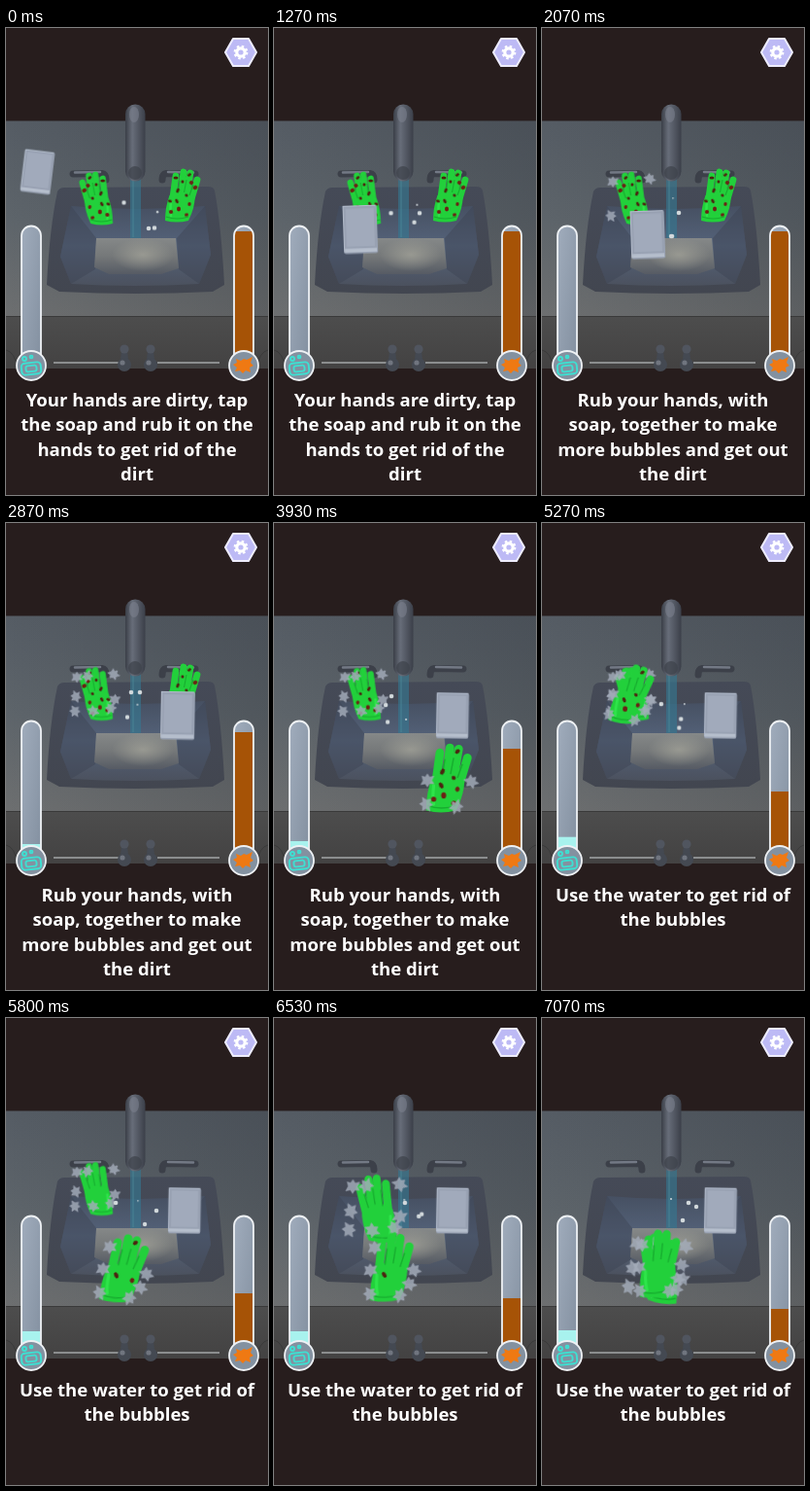
An HTML page for the animation above (7.14 s loop, 270x480 px).

```html
<!DOCTYPE html>
<html lang="en">
<head>
<meta charset="utf-8">
<title>Wash your hands</title>
<style>
html, body { margin: 0; width: 100%; height: 100%; overflow: hidden; background: #271d1d; }
svg { display: block; width: 100vw; height: 100vh; }
text { font: 700 18.55px "Open Sans", "Noto Sans", sans-serif; fill: #fff; text-anchor: middle; }

#soap, #left, #right, #dirt, #foam, .msg, .drop { animation: 7140ms linear infinite; }
#soap { animation-name: soap; }
#left { animation-name: left; }
#right { animation-name: right; }
#dirt { animation-name: dirt; }
#foam { animation-name: foam; }
.msg { animation-timing-function: step-end; }
#m1 { animation-name: m1; }
#m2 { animation-name: m2; }
#m3 { animation-name: m3; }
#d1 { animation-name: d1; }
#d2 { animation-name: d2; }
#d3 { animation-name: d3; }
#d4 { animation-name: d4; }

@keyframes soap {
  0%, 7.4% { transform: translate(32.5px, 148px) rotate(7deg) scale(.91); }
  8.4% { transform: translate(32px, 149px) rotate(4deg) scale(1.03); }
  13% { transform: translate(66px, 190px) rotate(0deg) scale(1.03); }
  17% { transform: translate(90px, 211px) rotate(-2deg) scale(1.03); }
  20% { transform: translate(86px, 196px) rotate(-2deg) scale(1.03); }
  24% { transform: translate(98px, 206px) rotate(-2deg) scale(1.03); }
  29% { transform: translate(109px, 212.5px) rotate(-2deg) scale(1.03); }
  32.5% { transform: translate(90px, 188px) rotate(-2deg) scale(1.03); }
  35.5% { transform: translate(104px, 200px) rotate(-1deg) scale(1.03); }
  40.2% { transform: translate(177px, 198px) rotate(1deg) scale(1.03); }
  43% { transform: translate(184px, 178px) rotate(1deg) scale(1.03); }
  46%, 100% { transform: translate(184px, 198px) rotate(1deg) scale(.98); }
}
@keyframes left {
  0%, 28% { transform: translate(93px, 175px); }
  40%, 88% { transform: translate(93px, 175.5px); }
  89.2% { transform: translate(94px, 172px) scale(1.27); }
  91.5%, 93.4% { transform: translate(106px, 196px) rotate(2deg) scale(1.27); }
  96% { transform: translate(117px, 244px) rotate(6deg) scale(1.27); }
  99%, 100% { transform: translate(121px, 257px) rotate(8deg) scale(1.3); }
}
@keyframes right {
  0%, 48.6% { transform: translate(182px, 172px); }
  50% { transform: translate(183px, 146px) scale(1.25); }
  52.5% { transform: translate(184px, 214px) scale(1.27); }
  55%, 58.8% { transform: translate(180px, 262px) scale(1.29); }
  61.5% { transform: translate(104px, 196px) rotate(0deg) scale(1.15); }
  64% { transform: translate(94px, 172px) rotate(4deg) scale(1.13); }
  66.2% { transform: translate(90px, 180px) rotate(8deg) scale(1.13); }
  69.5% { transform: translate(94px, 160px) rotate(8deg) scale(1.13); }
  72.5% { transform: translate(91px, 184px) rotate(8deg) scale(1.13); }
  75.5% { transform: translate(94px, 166px) rotate(8deg) scale(1.13); }
  78.4% { transform: translate(100px, 192px) rotate(8deg) scale(1.18); }
  81.2% { transform: translate(122px, 257px) rotate(5deg) scale(1.29); }
  84.5% { transform: translate(119px, 286px) rotate(4deg) scale(1.29); }
  88.7% { transform: translate(121px, 262px) rotate(2deg) scale(1.28); }
  91.5%, 93.4% { transform: translate(121px, 256px) rotate(-2deg) scale(1.28); }
  96% { transform: translate(118px, 259px) rotate(-4deg) scale(1.28); }
  99%, 100% { transform: translate(121px, 252px) rotate(-5deg) scale(1.26); }
}
@keyframes dirt {
  0%, 30% { transform: translateY(6px); }
  40.2% { transform: translateY(12px); }
  55%, 60% { transform: translateY(29px); }
  66.2% { transform: translateY(62px); }
  78% { transform: translateY(79px); }
  81.2% { transform: translateY(80px); }
  93.4% { transform: translateY(86px); }
  99%, 100% { transform: translateY(96px); }
}
@keyframes foam {
  0%, 20% { transform: translateY(136px); }
  29% { transform: translateY(131px); }
  40.2% { transform: translateY(127px); }
  55% { transform: translateY(124px); }
  66.2% { transform: translateY(121px); }
  78%, 93.4% { transform: translateY(119px); }
  99%, 100% { transform: translateY(118px); }
}
@keyframes m1 { 0% { opacity: 1; } 20%, 100% { opacity: 0; } }
@keyframes m2 { 0% { opacity: 0; } 20% { opacity: 1; } 67.2%, 100% { opacity: 0; } }
@keyframes m3 { 0% { opacity: 0; } 67.2%, 100% { opacity: 1; } }
@keyframes d1 {
  0%, 7.4% { transform: translate(147px, 206px); }
  18% { transform: translate(120px, 190px); }
  29% { transform: translate(141px, 190px); }
  40.2% { transform: translate(129px, 174px); }
  55% { transform: translate(121px, 178px); }
  66.2% { transform: translate(133px, 182px); }
  81.2% { transform: translate(113px, 190px); }
  99%, 100% { transform: translate(151px, 190px); }
}
@keyframes d2 {
  0%, 7.4% { transform: translate(153px, 205.5px); }
  18% { transform: translate(150px, 190px); }
  29% { transform: translate(134px, 214px); }
  40.2% { transform: translate(138px, 174px); }
  55% { transform: translate(115px, 187px); }
  66.2% { transform: translate(131px, 205px); }
  81.2% { transform: translate(155px, 198px); }
  99%, 100% { transform: translate(145px, 208px); }
}
@keyframes d3 {
  0%, 3.7% { transform: translate(121.5px, 179.5px); }
  3.8%, 7.4% { transform: translate(119px, 184px); }
  18% { transform: translate(145px, 200px); }
  29% { transform: translate(133px, 214px); }
  40.2% { transform: translate(125px, 199.5px); }
  55% { transform: translate(117px, 204.5px); }
  66.2% { transform: translate(139.5px, 209px); }
  81.2% { transform: translate(143px, 212px); }
  99%, 100% { transform: translate(159px, 194px); }
}
@keyframes d4 {
  0%, 3.7% { transform: translate(156px, 189px) scale(.6); }
  3.8%, 7.4% { transform: translate(159px, 188px) scale(.6); }
  29% { transform: translate(135px, 175px) scale(.4); }
  55% { transform: translate(136px, 202px) scale(.5); }
  66.2% { transform: translate(158px, 184px) scale(.5); }
  81.2% { transform: translate(136px, 188px) scale(.4); }
  99%, 100% { transform: translate(133px, 186px) scale(.5); }
}
</style>
</head>
<body>
<svg viewBox="0 0 270 480" preserveAspectRatio="none">
  <defs>
    <linearGradient id="top" x2="0" y2="1"><stop stop-color="#555c64"/><stop offset=".5" stop-color="#5d646a"/><stop offset="1" stop-color="#6d6f70"/></linearGradient>
    <linearGradient id="shade"><stop stop-color="#1c2026" stop-opacity="0"/><stop offset="1" stop-color="#1c2026" stop-opacity=".2"/></linearGradient>
    <linearGradient id="front" x2="0" y2="1"><stop stop-color="#4d4d4d"/><stop offset="1" stop-color="#434242"/></linearGradient>
    <linearGradient id="rim" x2="0" y2="1"><stop stop-color="#454a57"/><stop offset="1" stop-color="#424650"/></linearGradient>
    <linearGradient id="bowl" x2="0" y2="1"><stop stop-color="#465062"/><stop offset=".5" stop-color="#55637a"/><stop offset="1" stop-color="#4b515e"/></linearGradient>
    <linearGradient id="floor" x2="0" y2="1"><stop stop-color="#858888"/><stop offset=".5" stop-color="#757879"/><stop offset="1" stop-color="#565b64"/></linearGradient>
    <radialGradient id="glow"><stop stop-color="#a3a399" stop-opacity=".75"/><stop offset="1" stop-color="#a3a399" stop-opacity="0"/></radialGradient>
    <linearGradient id="metal"><stop stop-color="#3a3e47"/><stop offset=".35" stop-color="#676d79"/><stop offset="1" stop-color="#3b3f49"/></linearGradient>
    <linearGradient id="bar" x2="1" y2="1"><stop stop-color="#a0acbc"/><stop offset="1" stop-color="#8390a0"/></linearGradient>
    <clipPath id="tube"><rect x="-9.5" y="204" width="19" height="140" rx="9"/></clipPath>

    <g id="tap" stroke-linecap="round" fill="none">
      <path d="M69 150L99 149.500Q103 150 103 156" stroke="#3c4049" stroke-width="7"/>
      <path d="M71 148.500L97 148" stroke="#737985" stroke-width="2.500"/>
    </g>
    <g id="knob">
      <path d="M119 331h6l1 10h-8z" fill="#444952"/>
      <circle cx="122" cy="330" r="4.600" fill="#50555f"/>
      <circle cx="122" cy="346" r="7" fill="#444952"/>
      <circle cx="120" cy="344" r="2.600" fill="#70757f"/>
    </g>
    <g id="hand">
      <path d="M-10 2L-7-20M-2 0L1-24M4 0L8-23M9 4L15-16" stroke="#22d03b" stroke-width="6.800" stroke-linecap="round"/>
      <path d="M-13.500 0Q-2-8 12.500 1Q13 12 6 26Q-6 29-18 26Q-18 12-13.500 0z" fill="#22d03b"/>
      <path d="M-5-2L-3-15M1.500-3L4-16M7 0L11-11M-17 22Q-6 26 6 22" fill="none" stroke="#17ad2f" stroke-width="1.100"/>
      <path d="M-12 6Q-13 16-12 21" fill="none" stroke="#2ee54a" stroke-width="2.500" stroke-linecap="round"/>
    </g>
    <path id="bubble" d="M-5-4L-2-3L0-6L2-3L6-4L4 0L6 3L2 3L0 6L-2 3L-6 4L-4 0z"
      fill="#a4acba" fill-opacity=".82" stroke="#a4acba" stroke-opacity=".5" stroke-linejoin="round"/>
  </defs>

  <rect width="270" height="480" fill="#271d1d"/>
  <rect y="95.500" width="270" height="201" fill="url(#top)"/>
  <rect y="95.500" width="270" height="201" fill="url(#shade)"/>
  <rect y="296" width="270" height="54" fill="url(#front)"/>
  <path d="M0 296.500H270" stroke="#3a3a3a"/>
  <path d="M0 331Q9 333 12 350M270 331Q261 333 258 350" fill="none" stroke="#3a3a3a"/>
  <path d="M49 344H117M156 344H220" stroke="#8b8d8e" stroke-width="2"/>
  <use href="#knob"/><use href="#knob" x="27"/>

  <path d="M53 168Q55 164 60 164L208 163Q214 163 215 167Q222 205 225 264L213 271Q134 275 55 271L42 264Q45 205 53 168z" fill="url(#rim)"/>
  <path d="M67 183Q135 189 205 183L211 233L199 263Q132 267 67 263L56 235z" fill="url(#bowl)"/>
  <path d="M67 183L93 216L92 248L67 263L56 235zM205 183L176 216L178 248L199 263L211 233z" fill="#3c4352" opacity=".45"/>
  <path d="M93 216H175L178 247L160 253H106L91 246z" fill="url(#floor)"/>
  <ellipse cx="141" cy="233" rx="32" ry="17" fill="url(#glow)"/>
  <use href="#tap"/><use href="#tap" transform="matrix(-1 0 0 1 264 0)"/>
  <rect x="128" y="152" width="11" height="64" fill="#357891" opacity=".62"/>
  <path d="M131 156V215" stroke="#4a8797" stroke-width="1.500" opacity=".6"/>
  <rect x="123" y="78.500" width="20.500" height="79" rx="10" fill="url(#metal)"/>
  <ellipse cx="132" cy="89" rx="5" ry="8" fill="#7b818d" opacity=".6"/>
  <ellipse cx="133" cy="149" rx="7" ry="7" fill="#3d414a" opacity=".7"/>

  <g id="left"><use href="#hand" transform="scale(-.95 1)"/></g>
  <g id="right"><use href="#hand"/></g>
  <g id="soap">
    <path d="M-15-24H15Q17-24 17-22V22Q17 24 15 24H-15Q-17 24-17 22V-22Q-17-24-15-24z" fill="#98a1b2"/>
    <path d="M-14-21H14V17H-14z" fill="#a1aabb"/>
    <path d="M-16 19H16V22.500H-16z" fill="#b5becc"/>
    <path d="M-16.500 22V-23.500H16" fill="none" stroke="#b2bbca"/>
  </g>
  <g fill="#d2d9dc">
    <circle class="drop" id="d1" r="2.300"/><circle class="drop" id="d2" r="2.300"/>
    <circle class="drop" id="d3" r="2.200"/><circle class="drop" id="d4" r="2"/>
  </g>

  <g transform="translate(26)">
    <rect x="-10" y="203.500" width="20" height="142" rx="10" fill="url(#bar)"/>
    <g clip-path="url(#tube)"><rect id="foam" x="-10" y="203" width="20" height="145" fill="#a8f2ee"/></g>
    <rect x="-10" y="203.500" width="20" height="142" rx="10" fill="none" stroke="#eef1f4" stroke-width="1.800"/>
    <circle cy="347" r="15" fill="#8391a0" stroke="#eef1f4" stroke-width="1.800"/>
    <g fill="none" stroke="#3de0d2" stroke-width="1.900">
      <rect x="-10" y="344" width="20" height="12" rx="3.500" transform="rotate(-6 0 350)"/>
      <rect x="-5.500" y="347" width="11" height="6" rx="2" transform="rotate(-6 0 350)"/>
      <circle cx="-7" cy="340" r="2"/><circle cx="0" cy="338" r="1.400"/>
    </g>
  </g>
  <g transform="translate(245)">
    <rect x="-10" y="203.500" width="20" height="142" rx="10" fill="url(#bar)"/>
    <g clip-path="url(#tube)"><rect id="dirt" x="-10" y="203" width="20" height="145" fill="#a65306"/></g>
    <rect x="-10" y="203.500" width="20" height="142" rx="10" fill="none" stroke="#eef1f4" stroke-width="1.800"/>
    <circle cy="347" r="15" fill="#8391a0" stroke="#eef1f4" stroke-width="1.800"/>
    <path d="M-8 340l5 2l3-2l3 1l6-3l-2 6l3 3l-4 2l1 5l-5-2l-3 3l-3-3l-5 1l2-4l-4-3l4-2z" fill="#ef7913"/>
  </g>

  <path d="M226 25L234 11H250L258 25L250 39H234z" fill="#bdbaf5" stroke="#eeedff" stroke-width="2" stroke-linejoin="round"/>
  <circle cx="242" cy="25" r="6.300" fill="none" stroke="#fff" stroke-width="2.200" stroke-dasharray="2.474"/>
  <circle cx="242" cy="25" r="4.200" fill="none" stroke="#fff" stroke-width="3.200"/>

  <g class="msg" id="m1">
    <text x="135" y="389">Your hands are dirty, tap</text>
    <text x="135" y="414.300">the soap and rub it on the</text>
    <text x="135" y="439.500">hands to get rid of the</text>
    <text x="135" y="464.800">dirt</text>
  </g>
  <g class="msg" id="m2">
    <text x="135" y="389">Rub your hands, with</text>
    <text x="135" y="414.300">soap, together to make</text>
    <text x="135" y="439.500">more bubbles and get out</text>
    <text x="135" y="464.800">the dirt</text>
  </g>
  <g class="msg" id="m3">
    <text x="135" y="389">Use the water to get rid of</text>
    <text x="135" y="414.300">the bubbles</text>
  </g>
</svg>
<script>
const LOOP = 7140;

function add(parent, tag, attrs) {
  const el = document.createElementNS('http://www.w3.org/2000/svg', tag);
  for (const k in attrs) el.setAttribute(k, attrs[k]);
  return parent.appendChild(el);
}

// Hard switch of visibility at a moment of the loop
function toggle(el, ms, from) {
  const offset = ms / LOOP;
  el.animate([
    { opacity: from, offset: 0 }, { opacity: from, offset },
    { opacity: 1 - from, offset }, { opacity: 1 - from, offset: 1 }
  ], { duration: LOOP, iterations: Infinity });
}

const spots = [[-7, -18], [9, -13], [0, -14], [13, -8], [-13, 6], [4, 20],
  [-5, -5], [-12, 17], [4, 0], [-4, 14], [7, -21], [7, 9], [-6, 6]];

function dirty(hand, flip, start, gap) {
  spots.forEach(([x, y], i) => {
    const spot = add(hand, 'ellipse', {
      rx: 2.5 - i % 3 * .4, ry: 1.6 + i % 2 * .5, fill: i % 2 ? '#6b2014' : '#4c2410',
      transform: `translate(${x * flip} ${y}) rotate(${i * 50})`
    });
    toggle(spot, start + i * gap, 1);
  });
}

function lather(hand, points, size, start, gap) {
  points.forEach(([x, y], i) => {
    const b = add(hand, 'use', { href: '#bubble', transform: `translate(${x} ${y}) rotate(${i * 47}) scale(${size})` });
    toggle(b, start + i * gap, 0);
  });
}

const left = document.getElementById('left'), right = document.getElementById('right');
dirty(left, -.95, 2800, 250);
dirty(right, 1, 2300, 380);
lather(left, [[-20, -17], [18, -20], [-22, 18], [-9, -18], [19, 6], [-3, 18], [-21, 3], [15, 15]], .9, 1600, 170);
lather(right, [[-17, 2], [18, 3], [-18, 21], [6, 23]], .85, 2900, 150);
lather(right, [[-13, -16], [14, 14]], .85, 4350, 150);
</script>
</body>
</html>
```
